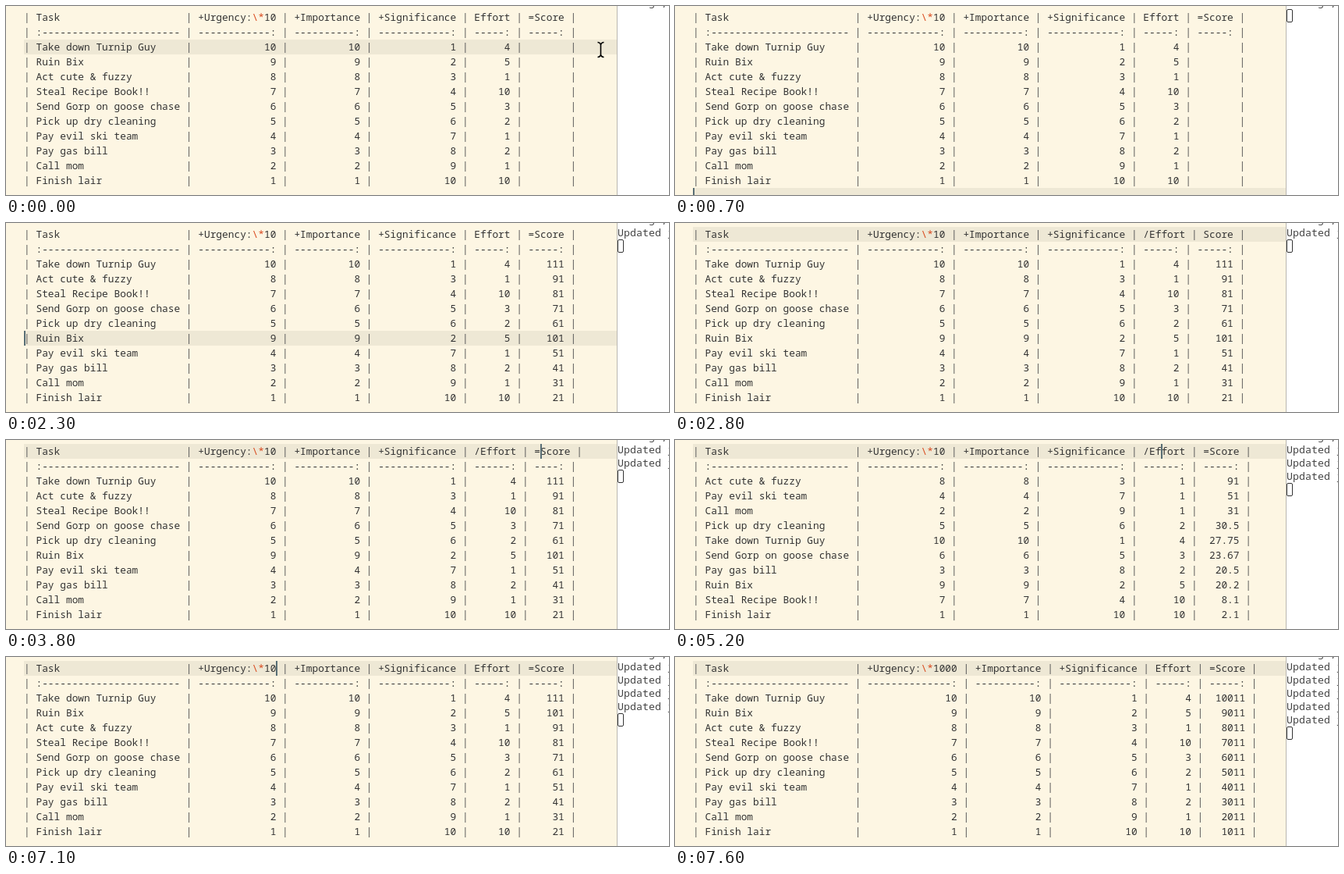
Recreate the animation shown at these times as an HTML page with a canvas. Size 850 px wide and 242 px high, loop 8 s.

```html
<!DOCTYPE html>
<html lang="en">
<head>
<meta charset="utf-8">
<title>Markdown table scores</title>
<style>
html, body { margin: 0; width: 850px; height: 242px; overflow: hidden; background: #fff; }
canvas { display: block; }
</style>
</head>
<body>
<canvas id="stage" width="850" height="242"></canvas>
<script>
const ctx = document.getElementById('stage').getContext('2d');
const LOOP = 8000;
const LEFT = 23.05, CELL = 7.697, LINE = 19, TOP = 5, PANE = 783;
const TERM_X = 784, TERM_CELL = 8, TERM_LINE = 17;
const MONO = '"Noto Sans Mono", "DejaVu Sans Mono", monospace';

const efforts = [4, 5, 1, 10, 3, 2, 1, 2, 1, 10];
const tasks = [
  'Take down Turnip Guy', 'Ruin Bix', 'Act cute & fuzzy', 'Steal Recipe Book!!',
  'Send Gorp on goose chase', 'Pick up dry cleaning', 'Pay evil ski team',
  'Pay gas bill', 'Call mom', 'Finish lair'
].map((name, i) => ({ name, rank: 10 - i, sig: i + 1, effort: efforts[i] }));

// Task order after moving the second row down by n places
function moved(n) {
  const list = tasks.slice();
  list.splice(1 + n, 0, list.splice(1, 1)[0]);
  return list;
}

function scoreOf(task, factor, divide) {
  const sum = task.rank * factor + task.rank + task.sig;
  return Math.round(sum / (divide ? task.effort : 1) * 100) / 100;
}

const byRatio = tasks.slice().sort((a, b) => scoreOf(b, 10, true) - scoreOf(a, 10, true));

const start = {
  factor: 10, divide: false, scored: false, rows: tasks, widths: [13, 6, 6],
  mul: '10', effort: 'Effort', score: '=Score',
  line: 2, col: null, log: 0, term: false
};

// Each step changes part of the editor state from its time on
const steps = [
  [100, { term: true, line: 4, col: 0 }],
  [200, { line: 6 }],
  [300, { line: 8 }],
  [400, { line: 10 }],
  [500, { line: 12 }],
  [1000, { scored: true }],
  [1100, { log: 1 }],
  [1700, { col: null }],
  [1900, { line: 9, col: 0 }],
  [2000, { line: 5 }],
  [2100, { line: 3 }],
  [2200, { line: 5, rows: moved(2) }],
  [2300, { line: 7, rows: moved(4) }],
  [2400, { line: 3 }],
  [2500, { line: 0, col: 75 }],
  [2600, { effort: '/Effort', col: 76 }],
  [2700, { score: 'Score', col: 85 }],
  [2800, { col: null }],
  [3000, { widths: [13, 7, 5], log: 2 }],
  [3300, { line: 1, col: 85 }],
  [3500, { line: 0 }],
  [3800, { score: '=Score', col: 86 }],
  [4200, { rows: byRatio, divide: true, widths: [13, 7, 6] }],
  [4400, { log: 3 }],
  [4700, { col: null }],
  [5000, { col: 84 }],
  [5100, { col: 81 }],
  [5200, { col: 78 }],
  [5300, { col: 77 }],
  [5400, { col: 76 }],
  [5500, { col: 75, effort: 'Effort' }],
  [5900, { rows: tasks, divide: false, widths: [13, 6, 6] }],
  [6000, { log: 4, col: null }],
  [6400, { col: 75 }],
  [7000, { col: 42 }],
  [7200, { mul: '100', col: 43 }],
  [7300, { mul: '1000', col: 44 }],
  [7500, { factor: 1000, widths: [15, 6, 6], col: null }],
  [7600, { log: 5 }]
];

function stateAt(t) {
  return Object.assign({}, start, ...steps.filter(s => s[0] <= t).map(s => s[1]));
}

function mouseAt(t) {
  if (t < 100) return [762, 56];
  if (t < 6600 || t >= 7000) return null;
  const k = (Math.floor(t / 100) - 66) / 3;
  return [600 - 254 * k, 136 - 121 * k];
}

const row = cells => '| ' + cells.join(' | ') + ' |';

function tableLines(s) {
  const [wm, we, ws] = s.widths;
  const widths = [wm, 11, 13, we, ws];
  const head = row(['Task'.padEnd(24), '+Urgency:\\*' + s.mul, '+Importance',
    '+Significance', s.effort, s.score]);
  const rule = row([':' + '-'.repeat(23), ...widths.map(w => '-'.repeat(w - 1) + ':')]);
  const body = s.rows.map(task => {
    const score = s.scored ? scoreOf(task, s.factor, s.divide) : '';
    const cells = [task.rank, task.rank, task.sig, task.effort, score];
    return row([task.name.padEnd(24), ...cells.map((c, i) => String(c).padStart(widths[i]))]);
  });
  return [head, rule, ...body];
}

function drawCells(text, x, y, pitch, color) {
  for (let i = 0; i < text.length; i++) {
    if (text[i] === ' ') continue;
    const escape = text[i] === '\\' || text[i] === '*';
    ctx.fillStyle = escape ? '#d9481c' : text[i] === '|' ? '#555' : color;
    ctx.fillText(text[i], x + i * pitch, y);
  }
}

function drawEditor(s) {
  ctx.fillStyle = '#fdf6e3';
  ctx.fillRect(0, 0, PANE, 242);
  ctx.fillStyle = '#eee8d5';
  ctx.fillRect(23, TOP + s.line * LINE, PANE - 23, LINE);
  ctx.font = '12.83px ' + MONO;
  tableLines(s).forEach((text, i) => drawCells(text, LEFT, 19 + i * LINE, CELL, '#333'));
  if (s.col !== null) {
    ctx.fillStyle = '#586e75';
    ctx.fillRect(Math.round(LEFT + s.col * CELL), TOP + s.line * LINE, 2, LINE);
  }
}

function drawTerminal(s) {
  ctx.fillStyle = '#fff';
  ctx.fillRect(PANE, 0, 850 - PANE, 242);
  ctx.fillStyle = '#b9b7b0';
  ctx.fillRect(PANE, 0, 1, 242);
  ctx.font = '13.2px ' + MONO;
  drawCells('     g ,', TERM_X, 0, TERM_CELL, '#444');
  for (let i = 0; i < s.log; i++) {
    drawCells('Updated j', TERM_X, 17 + i * TERM_LINE, TERM_CELL, '#444');
  }
  if (s.term) {
    ctx.strokeStyle = '#333';
    ctx.lineWidth = 1;
    ctx.beginPath();
    ctx.roundRect(TERM_X + 0.5, 4.5 + s.log * TERM_LINE, 7, 16, 1.5);
    ctx.stroke();
  }
}

// I-beam with ends that fork outwards
function drawMouse([x, y]) {
  ctx.strokeStyle = '#000';
  ctx.lineWidth = 1.6;
  ctx.beginPath();
  ctx.moveTo(x + 0.5, y - 7);
  ctx.lineTo(x + 0.5, y + 7);
  for (const v of [-1, 1]) {
    for (const h of [-1, 1]) {
      ctx.moveTo(x + 0.5 + h * 4, y + v * 9.5);
      ctx.quadraticCurveTo(x + 0.5 + h, y + v * 9.5, x + 0.5, y + v * 6.5);
    }
  }
  ctx.stroke();
}

function draw(t) {
  const s = stateAt(t);
  drawEditor(s);
  drawTerminal(s);
  const mouse = mouseAt(t);
  if (mouse) drawMouse(mouse);
}

let origin = null;
function tick(now) {
  if (origin === null) origin = now;
  draw((now - origin) % LOOP);
  requestAnimationFrame(tick);
}
draw(0);
requestAnimationFrame(tick);
</script>
</body>
</html>
```
